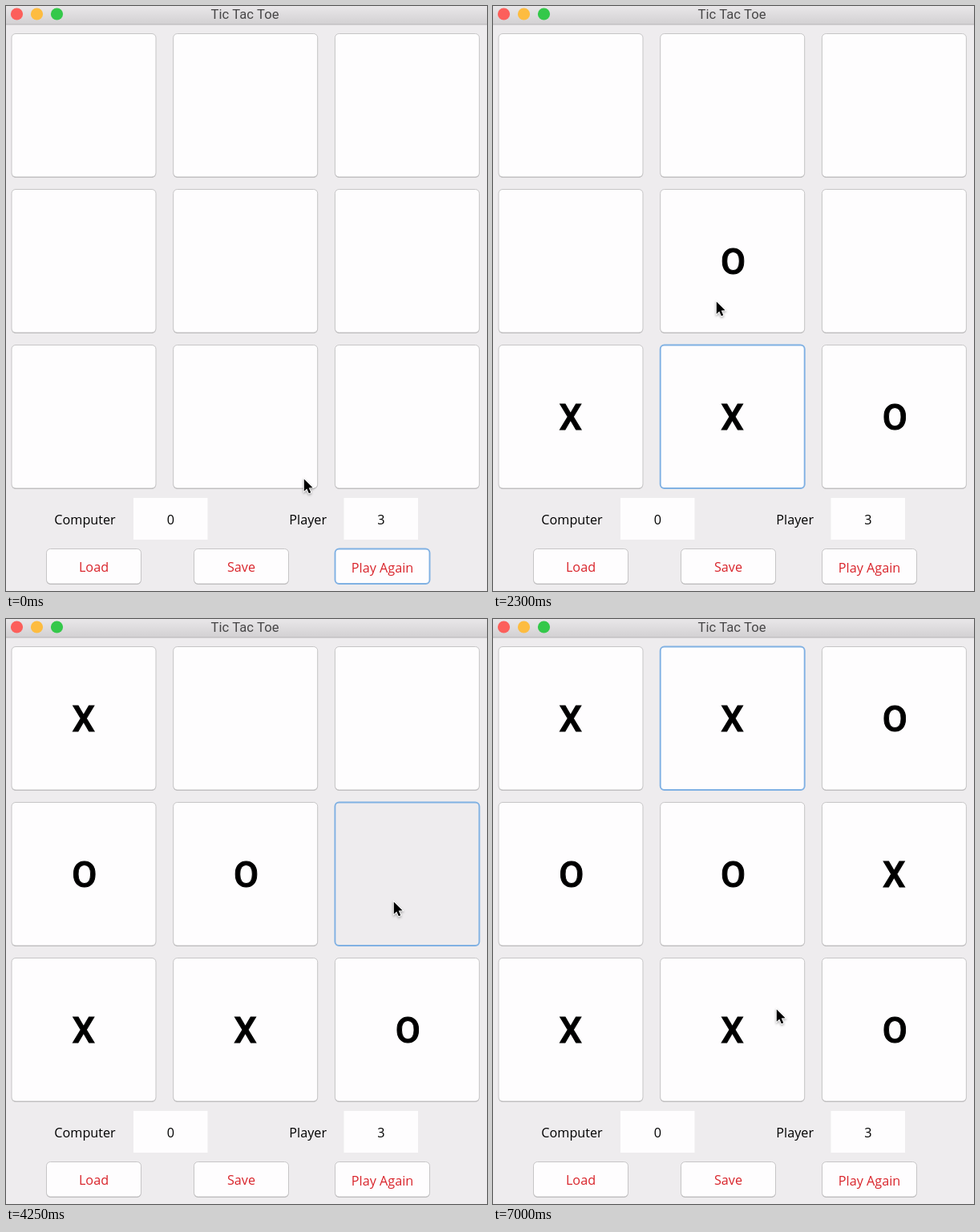
These frames come from a looping animation (600x729 px, 7.05 s). An HTML page with a canvas:

```html
<!DOCTYPE html>
<html lang="en">
<head>
<meta charset="utf-8">
<title>Tic Tac Toe</title>
<style>
html, body { margin: 0; width: 100%; height: 100%; overflow: hidden; background: #eeedee; }
canvas { display: block; width: 600px; height: 729px; }
</style>
</head>
<body>
<canvas id="stage" width="600" height="729"></canvas>
<script>
const ctx = document.getElementById('stage').getContext('2d');
const LOOP = 7050, STEP = 50, LEAD = 150, HOLD = 200;
const LEFT = 7, TOP = 34.5, PITCH_X = 201.7, PITCH_Y = 194;
const BACK = '#eeecee', WHITE = '#fefdfe', RED = '#d9242b';
const BODY = '500 16.2px "Open Sans", "Noto Sans", sans-serif';

// Where the pointer comes to rest; a reply cell makes the stop a click (-1: none left)
const STOPS = [
  { t: 0, x: 371, y: 588 },
  { t: 850, x: 120, y: 487, reply: 8 },
  { t: 1750, x: 282, y: 497, reply: 4 },
  { t: 2300, x: 278, y: 367 },
  { t: 3200, x: 97, y: 150, reply: 3 },
  { t: 3550, x: 99, y: 205 },
  { t: 4250, x: 483, y: 351, reply: 2 },
  { t: 5400, x: 312, y: 153, reply: -1 },
  { t: 7000, x: 353, y: 485 }
];
const CLICKS = STOPS.filter(s => 'reply' in s);

function cellAt(x, y) {
  return Math.floor((x - LEFT) / PITCH_X) + 3 * Math.floor((y - TOP) / PITCH_Y);
}

function pointerAt(t) {
  const i = STOPS.findIndex(s => s.t >= t);
  const b = STOPS[i], a = STOPS[Math.max(0, i - 1)];
  const u = (t - a.t) / (b.t - a.t || 1), k = u * u * (3 - 2 * u);
  return [a.x + (b.x - a.x) * k, a.y + (b.y - a.y) * k];
}

function panel(x, y, w, h, fill, focused) {
  const box = dy => {
    ctx.beginPath();
    ctx.roundRect(x, y + dy, w, h, 5);
  };
  if (!focused) {
    box(1);
    ctx.fillStyle = '#b9b8b9';
    ctx.fill();
  }
  box(0);
  ctx.fillStyle = fill;
  ctx.fill();
  ctx.lineWidth = focused ? 1.9 : 1;
  ctx.strokeStyle = focused ? '#80b1e3' : '#c6c5c6';
  ctx.stroke();
}

function label(text, x, y, color = '#000', font = BODY) {
  ctx.font = font;
  ctx.textAlign = 'center';
  ctx.fillStyle = color;
  ctx.fillText(text, x, y);
}

function mark(text, x, y) {
  label(text, x, y, '#000', '500 45px Roboto, sans-serif');
  ctx.strokeStyle = '#000';
  ctx.lineWidth = 1;
  ctx.strokeText(text, x, y);
}

function titleBar() {
  const g = ctx.createLinearGradient(0, 0, 0, 23);
  g.addColorStop(0, '#e9e7e9');
  g.addColorStop(1, '#d2d0d2');
  ctx.fillStyle = g;
  ctx.fillRect(0, 0, 600, 23);
  ctx.fillStyle = '#b8b6b8';
  ctx.fillRect(0, 22.5, 600, 1);
  ['#fc5f5b', '#fdbc40', '#34c84a'].forEach((color, i) => {
    ctx.beginPath();
    ctx.arc(13.5 + 25 * i, 10, 7.6, 0, 2 * Math.PI);
    ctx.fillStyle = color;
    ctx.fill();
  });
  label('Tic Tac Toe', 298, 16, '#474647', '16.6px Roboto, sans-serif');
}

function board(t) {
  const marks = Array(9).fill('');
  let focus = -1, pressed = -1;
  for (const click of CLICKS) {
    const down = click.t - LEAD;
    if (t < down) break;
    focus = cellAt(click.x, click.y);
    if (t < down + HOLD) {
      pressed = focus;
      break;
    }
    marks[focus] = 'X';
    if (click.reply >= 0) marks[click.reply] = 'O';
  }
  marks.forEach((m, i) => {
    const x = LEFT + PITCH_X * (i % 3), y = TOP + PITCH_Y * Math.floor(i / 3);
    panel(x, y, 180, 178.5, i === pressed ? BACK : WHITE, i === focus);
    if (m) mark(m, x + (m === 'O' ? 90.8 : 89.8), y + 105.3);
  });
  return focus;
}

function score(name, value, x, boxX) {
  ctx.fillStyle = WHITE;
  ctx.fillRect(boxX, 613, 92.5, 52);
  label(name, x, 646);
  label(value, boxX + 46.3, 646);
}

function button(text, x, baseline, focused) {
  panel(x, 676.5, 118, 43.5, WHITE, focused);
  label(text, x + 59, baseline, RED);
}

function pointer(x, y) {
  const arrow = [[0, 0], [0, 17], [3.9, 13.4], [6.7, 19.8], [9.4, 18.6], [6.6, 12.3], [12, 12]];
  ctx.save();
  ctx.translate(x + 0.8, y + 1.5);
  ctx.scale(0.9, 0.9);
  ctx.beginPath();
  arrow.forEach(p => ctx.lineTo(...p));
  ctx.closePath();
  ctx.shadowColor = 'rgba(0,0,0,.35)';
  ctx.shadowBlur = 3;
  ctx.shadowOffsetY = 1.5;
  ctx.lineWidth = 2;
  ctx.strokeStyle = '#fff';
  ctx.stroke();
  ctx.shadowColor = 'transparent';
  ctx.fillStyle = '#000';
  ctx.fill();
  ctx.restore();
}

function draw(t) {
  ctx.fillStyle = BACK;
  ctx.fillRect(0, 0, 600, 729);
  titleBar();
  const focus = board(t);
  score('Computer', '0', 98.5, 159);
  score('Player', '3', 376.7, 421.5);
  button('Load', 50.5, 704.5);
  button('Save', 234.5, 704.5);
  button('Play Again', 410.5, 705.5, focus < 0);
  pointer(...pointerAt(t));
}

const start = performance.now();
function tick() {
  const t = (performance.now() - start) % LOOP;
  draw(Math.floor(t / STEP) * STEP);
  requestAnimationFrame(tick);
}
tick();
</script>
</body>
</html>
```
